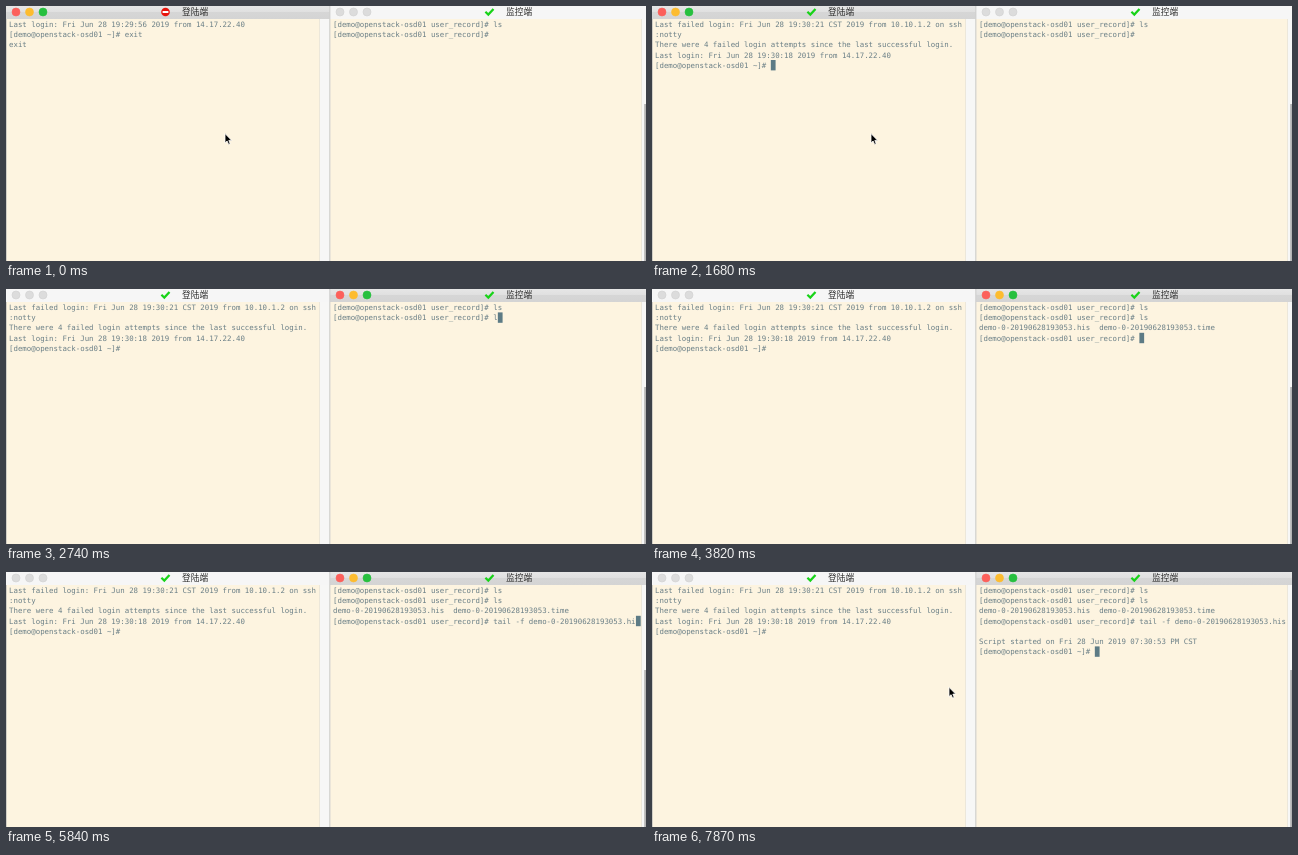
Recreate the animation shown at these times as an HTML page. Size 640 by 255 pixels, loop 7990 ms.

```html
<!DOCTYPE html>
<html lang="zh">
<head>
<meta charset="utf-8">
<title>登陆端 / 监控端</title>
<style>
  html, body { margin: 0; width: 100%; height: 100%; overflow: hidden; background: #fdf4e0; }
  svg { display: block; width: 100vw; height: 100vh; }
  .mono { font: 7.4px "DejaVu Sans Mono", monospace; fill: #6a7f86; white-space: pre; }
  .title { font: 8.7px "Noto Sans CJK SC", "Noto Sans CJK", sans-serif; fill: #303030; }
</style>
</head>
<body>
<svg id="stage" viewBox="0 0 640 255" preserveAspectRatio="none">
  <defs>
    <linearGradient id="bar" x2="0" y2="1">
      <stop offset="0" stop-color="#e6e6e6"/>
      <stop offset=".45" stop-color="#e0e0e0"/>
      <stop offset=".46" stop-color="#d6d6d6"/>
      <stop offset="1" stop-color="#d4d4d4"/>
    </linearGradient>
  </defs>
</svg>
<script>
const LOOP = 7990, CELL = 4.455, ROW = 10.2, TOP = 13.2;
const LIGHTS = ['#fc605b', '#fdbc2f', '#27c03f'];
const stage = document.getElementById('stage');

function add(parent, tag, attrs = {}, text) {
  const el = document.createElementNS('http://www.w3.org/2000/svg', tag);
  for (const key in attrs) el.setAttribute(key, attrs[key]);
  if (text) el.textContent = text;
  return parent.appendChild(el);
}

const show = (el, on) => el.setAttribute('visibility', on ? 'visible' : 'hidden');
const rect = (x, y, width, height, fill) => add(stage, 'rect', { x, y, width, height, fill });

// Latest entry whose start time has passed.
function at(steps, t) {
  let value = steps[0][1];
  for (const [start, v] of steps) if (t >= start) value = v;
  return value;
}

function makeWindow(x, width, textX, title) {
  rect(x, 0, width, 255, '#fdf4e0');
  const bar = rect(x, 0, width, 13, '#f6f6f6');
  const lights = LIGHTS.map((_, i) =>
    add(stage, 'circle', { cx: x + 10 + i * 13.5, cy: 6, r: 4, 'stroke-width': .6 }));
  const check = add(stage, 'path', {
    d: `M${x + 155.4} 5.8l2.9 2.8 5.2-5.7`, fill: 'none', stroke: '#18d318', 'stroke-width': 2.2
  });
  const stop = add(stage, 'g');
  add(stop, 'circle', { cx: x + 159.5, cy: 6, r: 4.3, fill: '#e8140c' });
  add(stop, 'rect', { x: x + 156.6, y: 5, width: 5.8, height: 2, fill: '#fff' });
  add(stage, 'text', { x: x + 176, y: 9.2, class: 'title' }, title);
  const cursor = rect(0, 0, CELL + .3, 10.4, '#5d7b85');
  const rows = Array.from({ length: 7 }, (_, i) =>
    add(stage, 'text', { x: textX, y: TOP + i * ROW + 7.7, class: 'mono' }));

  return {
    draw(lines, active, blink, ok) {
      bar.setAttribute('fill', active ? 'url(#bar)' : '#f6f6f6');
      lights.forEach((el, i) => {
        el.setAttribute('fill', active ? LIGHTS[i] : '#dcdcdc');
        el.setAttribute('stroke', active ? LIGHTS[i] : '#d0d0d0');
      });
      show(check, ok);
      show(stop, !ok);
      rows.forEach((el, i) => {
        const line = lines[i] || '';
        if (el.textContent !== line) el.textContent = line;
      });
      const last = lines.length - 1;
      cursor.setAttribute('x', textX + lines[last].length * CELL);
      cursor.setAttribute('y', TOP + last * ROW);
      show(cursor, active && blink);
    }
  };
}

const left = makeWindow(0, 324, 3, '登陆端');
const right = makeWindow(324, 316, 327, '监控端');

// Window edges and scroll bars
rect(0, 13, 1, 242, '#d2cfc6');
rect(313, 13, 1, 242, '#ece7da');
rect(314, 13, 9.5, 242, '#f7f7f6');
rect(323.2, 0, 1.2, 255, '#d0d0cf');
rect(635, 13, 1, 242, '#ece7da');
rect(636, 13, 4, 242, '#f7f7f6');
rect(638.2, 98, 1.8, 157, '#b4b4b4');

const mouse = add(stage, 'path', {
  d: 'M0 0V9.3L2.1 7.4 3.6 10.8 5.2 10.1 3.8 6.8H6.7Z',
  fill: '#000', stroke: '#fff', 'stroke-width': .8, 'stroke-linejoin': 'round'
});

const home = '[demo@openstack-osd01 ~]# ';
const rec = '[demo@openstack-osd01 user_record]# ';
const log = 'demo-0-20190628193053.';
const tail = rec + 'tail -f ' + log;

const session = ['Last login: Fri Jun 28 19:29:56 2019 from 14.17.22.40', home + 'exit', 'exit'];
const banner = [
  'Last failed login: Fri Jun 28 19:30:21 CST 2019 from 10.10.1.2 on ssh',
  ':notty',
  'There were 4 failed login attempts since the last successful login.',
  'Last login: Fri Jun 28 19:30:18 2019 from 14.17.22.40'
];
const leftSteps = [[0, session], [240, banner], [360, [...banner, home]]];

const first = rec + 'ls';
const listed = [first, first, `${log}his  ${log}time`];
const typed = text => [...listed, text];
const started = [...typed(tail + 'his'), '', 'Script started on Fri 28 Jun 2019 07:30:53 PM CST'];
const rightSteps = [
  [0, [first, rec]],
  [2740, [first, rec + 'l']],
  [2860, [first, first]],
  [2980, typed(rec)],
  [4060, typed(rec + 't')],
  [4180, typed(rec + 'tai')],
  [4300, typed(rec + 'tail ')],
  [4540, typed(rec + 'tail -')],
  [4660, typed(rec + 'tail -f ')],
  [4780, typed(rec + 'tail -f ' + log.slice(0, 2))],
  [4890, typed(tail)],
  [5840, typed(tail + 'hi')],
  [5960, [...typed(tail + 'his'), '']],
  [6320, [...started, '']],
  [6440, [...started, home]]
];

const blinks = [0, 600, 1200, 1680, 2160, 2740, 3220, 3820, 4300, 4890, 5250, 5840, 6320, 6800, 7280, 7750]
  .map((start, i) => [start, i % 2 === 1]);

const mouseSteps = [
  [0, [219, 127.6]], [2160, [246, 131]], [2280, [362, 141]], [2390, [420.2, 144.8]],
  [2740, null], [7870, [297, 115.3]]
];

function draw(t) {
  const blink = at(blinks, t), onLeft = t < 2500;
  left.draw(at(leftSteps, t), onLeft, blink, t >= 120);
  right.draw(at(rightSteps, t), !onLeft, blink, true);
  const spot = at(mouseSteps, t);
  show(mouse, spot);
  if (spot) mouse.setAttribute('transform', `translate(${spot})`);
}

const begin = performance.now();
function tick(now) {
  draw(Math.max(0, now - begin) % LOOP);
  requestAnimationFrame(tick);
}
draw(0);
requestAnimationFrame(tick);
</script>
</body>
</html>
```
